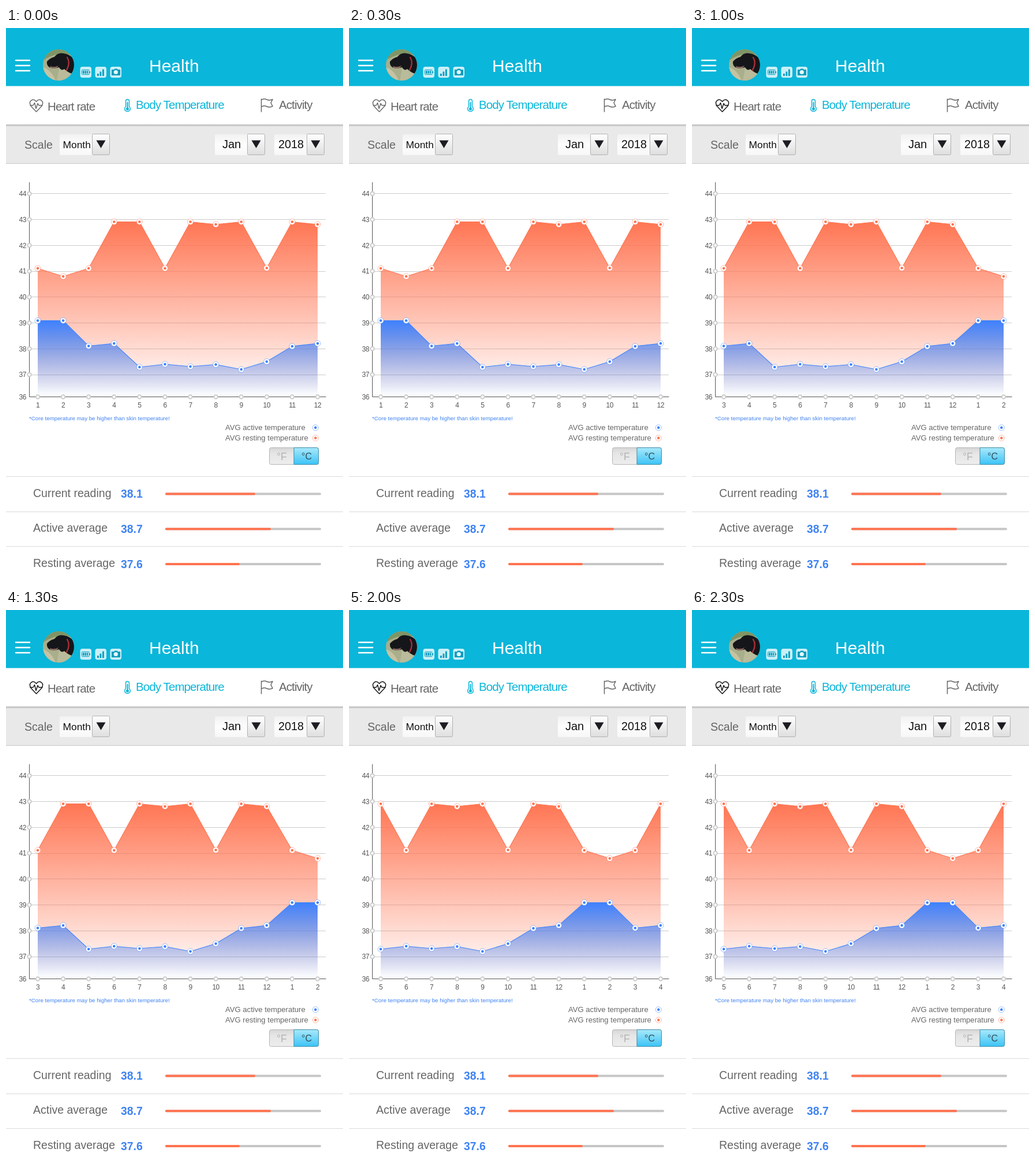
Recreate the animation shown at these times as an HTML page. Size 584 by 959 pixels, loop 2500 ms.

```html
<!DOCTYPE html>
<html lang="en">
<head>
<meta charset="utf-8">
<title>Health</title>
<style>
  html, body { margin: 0; width: 100%; height: 100%; overflow: hidden; background: #fff; }
  svg { display: block; width: 584px; height: 959px; }
  text { font-family: "Liberation Sans", Arial, sans-serif; fill: #666; }
  .tab { font-size: 20.5px; letter-spacing: -.9px; }
  .on { fill: #0ab6d9; }
  .pick { font-size: 20px; fill: #111; }
  .tick { font-size: 12px; letter-spacing: -.5px; fill: #555; }
  .key { font-size: 13.1px; }
  .row { font-size: 19.5px; }
  .val { font-size: 19.4px; font-weight: bold; fill: #3f83f3; }
  .line { fill: none; stroke-linecap: round; stroke-linejoin: round; }
</style>
</head>
<body>
<svg viewBox="0 0 584 959">
  <defs>
    <linearGradient id="warm" gradientUnits="userSpaceOnUse" x1="0" y1="335" x2="0" y2="632">
      <stop offset="0" stop-color="#ff7350" stop-opacity=".98"/>
      <stop offset="1" stop-color="#ff7350" stop-opacity="0"/>
    </linearGradient>
    <linearGradient id="cool" gradientUnits="userSpaceOnUse" x1="0" y1="506" x2="0" y2="638">
      <stop offset="0" stop-color="#3e82ff"/>
      <stop offset="1" stop-color="#4a78e0" stop-opacity="0"/>
    </linearGradient>
    <linearGradient id="box" x2="0" y2="1">
      <stop offset="0" stop-color="#f2f2f2"/><stop offset=".5" stop-color="#fdfdfd"/><stop offset="1" stop-color="#f7f7f7"/>
    </linearGradient>
    <linearGradient id="btn" x2="0" y2="1">
      <stop offset="0" stop-color="#fff"/><stop offset="1" stop-color="#dedede"/>
    </linearGradient>
    <linearGradient id="off" x2="0" y2="1">
      <stop offset="0" stop-color="#d6d6d6"/><stop offset=".35" stop-color="#e6e6e6"/><stop offset="1" stop-color="#ededed"/>
    </linearGradient>
    <linearGradient id="lit" x2="0" y2="1">
      <stop offset="0" stop-color="#a8e9fb"/><stop offset="1" stop-color="#3cc3f6"/>
    </linearGradient>
    <linearGradient id="shade" x2="0" y2="1">
      <stop offset="0" stop-color="#b4b4b4"/><stop offset="1" stop-color="#e9e9e9"/>
    </linearGradient>
    <clipPath id="face"><circle cx="91" cy="64" r="27"/></clipPath>
  </defs>

  <!-- header -->
  <rect width="584" height="100.5" fill="#0ab6d9"/>
  <path d="M17 56H41M17 65H41M17 74H41" class="line" stroke="#fff" stroke-width="2.6"/>
  <g clip-path="url(#face)">
    <rect x="64" y="37" width="54" height="54" fill="#a9ae8b"/>
    <path d="M64 37H118V48Q90 38 64 56Z" fill="#7f9566"/>
    <path d="M64 68Q78 72 86 91H64Z" fill="#c6c2a2"/>
    <path d="M92 70L118 76V91H88Z" fill="#b9bb9a"/>
    <path d="M71 58Q76 52 84 50Q90 42 100 44Q110 45 118 54V80Q108 78 101 71Q96 75 92 68Q82 71 75 68Q70 64 71 58Z" fill="#15161a"/>
    <path d="M76 66Q84 69 91 65L88 69Q82 71 77 69Z" fill="#8d6a62"/>
    <path d="M106 51Q112 60 105 73" class="line" stroke="#b3303a" stroke-width="2.2"/>
  </g>
  <g fill="#c9eff7">
    <rect x="128.500" y="67" width="19.500" height="19" rx="4"/>
    <rect x="154.500" y="67" width="19.500" height="19" rx="4"/>
    <rect x="180.500" y="67" width="19.500" height="19" rx="4"/>
  </g>
  <g fill="#0a9dbd">
    <rect x="131.500" y="72.500" width="12.500" height="8" rx="1" fill="none" stroke="#0a9dbd"/>
    <path d="M133 74h2.600v5h-2.600zM136.500 74h2.600v5h-2.600zM140 74h2v5h-2zM144.500 75h1.500v3h-1.500zM158 79h2.800v4h-2.800zM162.500 75.500h2.800v7.500h-2.800zM167 71.500h2.800v11.500h-2.800z"/>
    <path d="M183 72h4l1.500-1.500h4l1.500 1.500h4v10h-15z"/>
    <circle cx="190.300" cy="76.500" r="3.600" fill="#e6f8fb"/>
  </g>
  <text x="248" y="76" font-size="30" style="fill:#fff">Health</text>

  <!-- tabs -->
  <g id="heart" class="line" stroke="#111" stroke-width="1.4">
    <path d="M52.500 145L43.500 135.500Q39.500 129.500 43 126Q48 121.500 52.500 127.500Q57 121.500 62 126Q65.500 129.500 61.500 135.500Z"/>
    <path d="M42 134H47L49.500 129.500L52 139.500L55 130.500L57 134H63"/>
  </g>
  <text class="tab" x="72" y="142.500">Heart rate</text>
  <g class="line" stroke="#0ab6d9" stroke-width="1.5">
    <path d="M207.500 136V126.500a3 3 0 0 1 6 0V136a4.800 4.800 0 1 1-6 0Z"/>
    <path d="M210.500 129V138" stroke-width="2"/>
    <circle cx="210.500" cy="140" r="1.800" fill="#0ab6d9"/>
  </g>
  <text class="tab on" x="225" y="140">Body Temperature</text>
  <path class="line" stroke="#666" stroke-width="1.5" d="M442.500 123V145M442.500 124.500Q447 121.500 452 124Q457 126 462 123.500L459 129.500L462 135.500Q457 138 452 136Q447 133.500 442.500 136.500"/>
  <text class="tab" x="473" y="140">Activity</text>

  <!-- filters -->
  <rect y="167" width="584" height="68" fill="#e9e9e9"/>
  <rect y="167" width="584" height="4" fill="url(#shade)"/>
  <path d="M0 234.500H584" stroke="#c6c6c6"/>
  <text x="32" y="208.500" font-size="19.600">Scale</text>
  <g id="picks"></g>

  <!-- chart -->
  <g id="grid"></g>
  <g id="plot"></g>
  <text x="40" y="679" font-size="9.730" style="fill:#3f83f3">*Core temperature may be higher than skin temperature!</text>
  <text class="key" x="380" y="696">AVG active temperature</text>
  <text class="key" x="380" y="714">AVG resting temperature</text>
  <g id="keys"></g>

  <!-- unit switch -->
  <rect x="456.500" y="726.500" width="85" height="29" rx="3" fill="url(#off)" stroke="#b5b5b5"/>
  <path d="M499 726.500H538.500a3 3 0 0 1 3 3V752.500a3 3 0 0 1-3 3H499Z" fill="url(#lit)" stroke="#3a8ba6"/>
  <text x="469" y="748" font-size="17.500" style="fill:#b2b2b2">°F</text>
  <text x="512" y="747" font-size="16" style="fill:#334c56">°C</text>

  <g id="rows"></g>
</svg>
<script>
  const WARM = '#ff7350', COOL = '#3e82ff', BASE = 638.5, STEP = 500;
  const resting = [416, 430, 416, 335.5, 335.5, 416, 335.5, 340, 335.5, 415.5, 335.5, 340];
  const active = [506.5, 506.5, 550.5, 546, 587, 582, 586, 582.5, 591, 577.5, 551, 546];

  const put = (id, html) => { document.getElementById(id).innerHTML = html; };
  const px = i => +(55 + i * 485 / 11).toFixed(1);
  const ring = (x, y) => `<circle cx="${x}" cy="${y}" r="3.2" fill="#fff" stroke="#ccc" stroke-width="2"/>`;
  const dot = (x, y, c) =>
    `<circle cx="${x}" cy="${y}" r="5" fill="#fff" stroke="${c}" stroke-opacity=".5"/>` +
    `<circle cx="${x}" cy="${y}" r="2.3" fill="${c}"/>`;

  const pick = (x, label, tx, size) => `
    <rect x="${x}" y="184" width="57" height="36" rx="2" fill="url(#box)"/>
    <rect x="${x + 56.5}" y="183.500" width="30" height="36" rx="2" fill="url(#btn)" stroke="#b0b0b0"/>
    <path d="M${x + 63.5} 194.500h16l-8 13.500z" fill="#1c1c22"/>
    <text class="pick" x="${tx}" y="208" style="font-size:${size}px">${label}</text>`;
  put('picks', pick(93, 'Month', 98.5, 17.4) + pick(362, 'Jan', 375, 20) + pick(465, '2018', 472, 19.8));

  // The lowest interval of the scale is shorter than the others.
  let grid = '', marks = '';
  for (let v = 44; v >= 36; v--) {
    const y = v > 36 ? +(286.8 + (44 - v) * 44.74).toFixed(1) : BASE;
    const line = Math.floor(y) + .5;
    if (v > 36) {
      grid += `<path d="M41 ${line}H554" stroke="#ccc"/>`;
      marks += ring(40.5, y);
    }
    marks += `<text class="tick" x="22.500" y="${y + 4.3}">${v}</text>`;
  }
  put('grid', grid + `<path d="M40.500 267V${BASE}H554.500" fill="none" stroke="#555"/>` + marks);

  const area = (ys, fill, c) => {
    const pts = ys.map((y, i) => px(i) + ' ' + y).join('L');
    return `<path d="M${pts}V${BASE}H55Z" fill="url(#${fill})"/>` +
      `<path d="M${pts}" fill="none" stroke="${c}" stroke-width="1.1"/>`;
  };
  const turn = (list, n) => list.slice(n).concat(list.slice(0, n));

  function draw(n) {
    const top = turn(resting, n), low = turn(active, n);
    let html = area(top, 'warm', WARM) + area(low, 'cool', COOL);
    for (let i = 0; i < 12; i++) {
      const x = px(i);
      html += dot(x, top[i], WARM) + dot(x, low[i], COOL) + ring(x, BASE) +
        `<text class="tick" x="${x}" y="657" text-anchor="middle">${(i + n) % 12 + 1}</text>`;
    }
    put('plot', html);
    document.getElementById('heart').setAttribute('stroke', n ? '#111' : '#666');
  }

  put('keys', dot(536.3, 691.8, COOL) + dot(536.3, 709.8, WARM));

  put('rows', [['Current reading', '38.1', 432], ['Active average', '38.7', 459], ['Resting average', '37.6', 405]]
    .map(([name, val, end], i) => {
      const y = 806.5 + i * 60.7;
      return `<path d="M0 ${Math.floor(776.5 + i * 60.5) + .5}H584" stroke="#dadada"/>
        <text class="row" x="47" y="${y + 5}">${name}</text>
        <text class="val" x="199" y="${y + 6.8}">${val}</text>
        <path class="line" d="M278 ${y}H544" stroke="#c6c6c6" stroke-width="4"/>
        <path class="line" d="M278 ${y}H${end - 2}" stroke="${WARM}" stroke-width="4"/>`;
    }).join(''));

  let shown = -1;
  const start = performance.now();
  function tick() {
    const n = Math.floor(Math.max(0, performance.now() - start) / STEP) % 5;
    if (n !== shown) draw(shown = n);
    requestAnimationFrame(tick);
  }
  tick();
</script>
</body>
</html>
```
